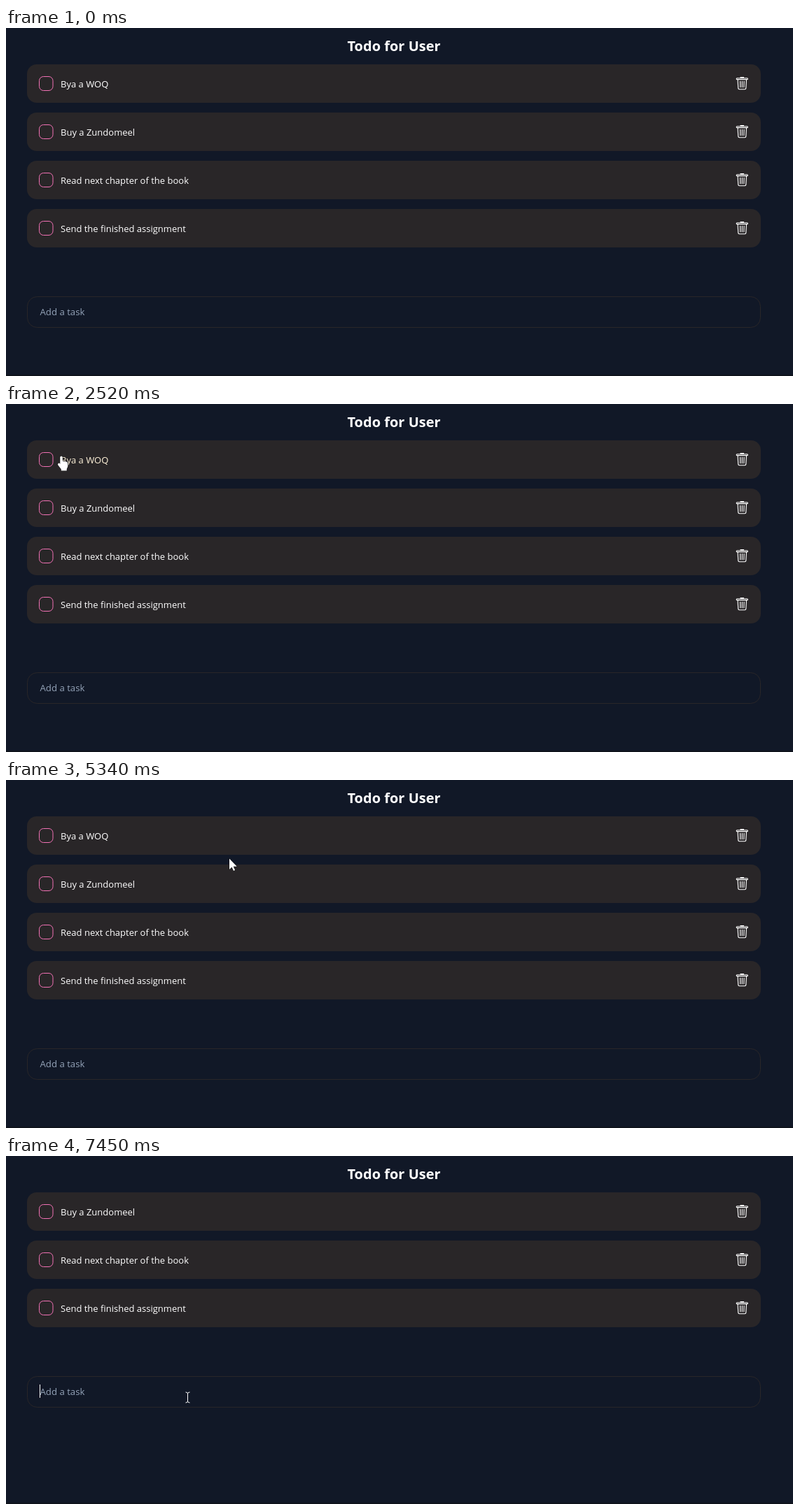
An HTML page with a canvas for the animation above (8000 ms loop, 1124x498 px).

```html
<!DOCTYPE html>
<html lang="en">
<head>
<meta charset="utf-8">
<title>Todo</title>
<style>
  html, body { margin: 0; width: 100%; height: 100%; overflow: hidden; background: #111827; }
  canvas { display: block; }
</style>
</head>
<body>
<canvas width="1124" height="498"></canvas>
<script>
const ctx = document.querySelector('canvas').getContext('2d');
const LOOP = 8000, PITCH = 69, DELETED_AT = 6460;
const FAMILY = '"Open Sans", "Noto Sans", sans-serif';
const LABEL_FONT = `500 13px ${FAMILY}`, INPUT_FONT = `13.2px ${FAMILY}`, TITLE_FONT = `bold 20px ${FAMILY}`;
const WHITE = [255, 255, 255], CREAM = [253, 241, 216], AMBER = [217, 119, 6], RED = [220, 38, 38];
const PINK = '#f472b6', STONE = '#292628';
const TASKS = ['Bya a WOQ', 'Buy a Zundomeel', 'Read next chapter of the book', 'Send the finished assignment'];

const TRASH = new Path2D('M6 .5h4M1.8 1.5h12.4a.8.8 0 0 1 0 1.7H1.8a.8.8 0 0 1 0-1.7z' +
  'M2.6 3.2l.6 10.8a1.5 1.5 0 0 0 1.5 1.4h6.6a1.5 1.5 0 0 0 1.5-1.4L13.4 3.2' +
  'M5.6 5.5l.2 7.3M8 5.5v7.3M10.4 5.5l-.2 7.3');
const CHECK = new Path2D('M51.5 80l4 4 7.5-8.5');
const ARROW = new Path2D('M0 0v15.5l3.5-3.3 2.5 5.3 2.2-1-2.4-5.2h5z');
const HAND = new Path2D('M-2 1.7a1.7 1.7 0 0 1 3.5 0V7l6 1.2q1.6.5 1.6 2.6v4l-1.6 4V21h-8v-2.2l-4.3-5.5q-1.4-2 .2-2.9t2.6 1.2z');
const IBEAM = new Path2D('M-3-7.5q3 0 3 2v11q0 2-3 2M3-7.5q-3 0-3 2M0 5.5q0 2 3 2');

const mix = (a, b, u) => a + (b - a) * u;
const blend = (a, b, u) => `rgb(${a.map((v, i) => Math.round(mix(v, b[i], u)))})`;
const easeOut = u => 1 - (1 - u) ** 2.2;
const smooth = u => u * u * (3 - 2 * u);
const stepOf = (t, start, end, count) =>
  Math.min(count - 1, Math.floor((t - start) / (end - start) * (count - 1) + .15));

// The pointer jumps about every 140 ms along eased paths.
function pointerAt(t) {
  if (t < 550) return null;
  if (t < 1680) {
    const u = stepOf(t, 550, 1530, 8) / 7;
    return [mix(793, 584, u ** 5.6), mix(489, 313, u ** 3.6)];
  }
  if (t < 2780) {
    const u = easeOut((stepOf(t, 1680, 2650, 8) + 1) / 8);
    return [mix(584, 74, u), mix(313, 72, u)];
  }
  if (t < 2920) return [70, 73];
  if (t < 3930) return [68, 74];
  if (t < 4500) return [69, 74];
  if (t < 5340) return [69, 77];
  if (t < DELETED_AT) {
    const u = easeOut((stepOf(t, 5340, 6330, 8) + 1) / 8);
    return [mix(69, 1051, u), mix(77, 88, u) + 172 * u * (1 - u)];
  }
  const u = smooth(stepOf(t, DELETED_AT, 7170, 6) / 5);
  return [mix(1051, 259.5, u), mix(88, 345.5, u)];
}

function doneAt(t) {
  if (t < 3370 || t >= 4650) return 0;
  if (t >= 4500) return .4;
  return t < 3510 ? .35 : t < 3650 ? .8 : 1;
}

function trashRedness(t) {
  if (t < 6185 || t >= 6600) return 0;
  return t < 6325 ? .5 : t < DELETED_AT ? 1 : .5;
}

function box(x, y, w, h, r, fill, stroke) {
  ctx.beginPath();
  ctx.roundRect(x, y, w, h, r);
  if (fill) { ctx.fillStyle = fill; ctx.fill(); }
  if (stroke) { ctx.strokeStyle = stroke; ctx.lineWidth = 1; ctx.stroke(); }
}

function text(str, x, y, color, font, align = 'left') {
  ctx.font = font;
  ctx.textAlign = align;
  ctx.fillStyle = color;
  ctx.fillText(str, x, y);
}

function drawTask(label, index, done, hover, redness) {
  ctx.save();
  ctx.translate(0, index * PITCH);
  box(30, 52, 1048, 55, 14, STONE);
  box(47.5, 69.5, 19.5, 20, 6, null, PINK);
  const color = done ? blend(WHITE, AMBER, done) : blend(WHITE, CREAM, hover);
  text(label, 78, 84.8, color, LABEL_FONT);
  if (done) {
    ctx.fillStyle = color;
    ctx.fillRect(78, 79, ctx.measureText(label).width, 1);
    ctx.globalAlpha = done;
    box(47, 69, 20.5, 21, 6, PINK);
    ctx.strokeStyle = '#1f2937';
    ctx.lineWidth = 1.6;
    ctx.stroke(CHECK);
    ctx.globalAlpha = 1;
  }
  ctx.translate(1042.1, 70);
  ctx.scale(1.15, 1.15);
  ctx.strokeStyle = blend(WHITE, RED, redness);
  ctx.lineWidth = 1;
  ctx.lineCap = 'round';
  ctx.stroke(TRASH);
  ctx.restore();
}

function drawPointer([x, y], onHand, onInput) {
  ctx.save();
  ctx.translate(x, y);
  ctx.lineWidth = 1;
  if (onInput) {
    ctx.strokeStyle = '#fff';
    ctx.stroke(IBEAM);
  } else {
    const shape = onHand ? HAND : ARROW;
    ctx.strokeStyle = '#000';
    ctx.stroke(shape);
    ctx.fillStyle = '#fff';
    ctx.fill(shape);
  }
  ctx.restore();
}

function draw(t) {
  const pointer = pointerAt(t);
  const [px, py] = pointer || [-99, -99];
  const tasks = t >= DELETED_AT ? TASKS.slice(1) : TASKS;
  const inputY = 108 + tasks.length * PITCH;
  const onLabel = px > 40 && px < 150 && py > 66 && py < 92;
  const onTrash = px > 1036 && py > 66 && py < 94;
  const onInput = px < 1078 && py > inputY && py < inputY + 45;

  ctx.fillStyle = '#111827';
  ctx.fillRect(0, 0, 1124, 498);
  ctx.fillStyle = '#0f131c';
  ctx.fillRect(0, 496, 1124, 2);
  text('Todo for User', 554, 32.5, '#fff', TITLE_FONT, 'center');

  tasks.forEach((label, i) => drawTask(label, i,
    i ? 0 : doneAt(t), !i && onLabel && px > 69.5 ? 1 : 0, i ? 0 : trashRedness(t)));

  box(30.5, inputY + .5, 1047, 44, 14, null, STONE);
  text('Add a task', 48.5, inputY + 27, '#94a3b8', INPUT_FONT);
  if (t >= 7450) {
    ctx.fillStyle = '#fff';
    ctx.fillRect(48, inputY + 12, 1, 19);
  }
  if (pointer) drawPointer(pointer, onLabel || onTrash, onInput);
}

const start = performance.now();
function tick() {
  draw((performance.now() - start) % LOOP);
  requestAnimationFrame(tick);
}
tick();
</script>
</body>
</html>
```
